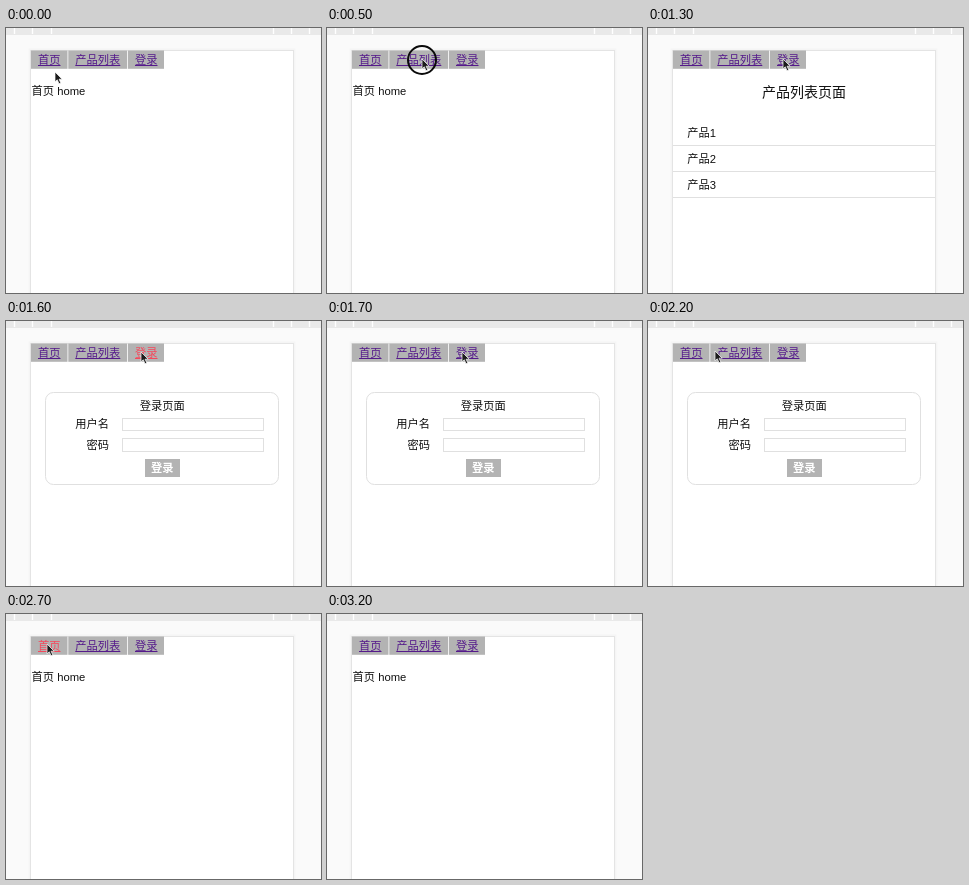
An HTML page that plays this animation: 315x265 px, repeating every 3300 ms.

```html
<!DOCTYPE html>
<html lang="zh-CN">
<head>
<meta charset="utf-8">
<title>Tab routing</title>
<style>
  html, body { margin: 0; width: 100%; height: 100%; overflow: hidden; background: #fafafa; }
  svg { display: block; width: 100%; height: 100%; }
  text { font: 11.25px "Liberation Sans", "Noto Sans CJK SC", "Noto Sans CJK", sans-serif; fill: #111; }
  .title { font-size: 14px; }
  .button { font-weight: bold; fill: #fff; }
  .mid { text-anchor: middle; }
  .end { text-anchor: end; }
  .line { fill: none; stroke: #e0e0e0; }
  .gray { fill: #b3b3b3; }
</style>
</head>
<body>
<svg viewBox="0 0 315 265">
  <rect width="315" height="265" fill="#fafafa"/>
  <rect width="315" height="7" fill="#e9e9e9"/>
  <path d="M8.5 0V6M26.5 0V6M45.5 0V6M267.5 0V6M285.5 0V6M303.5 0V6" stroke="#fff" stroke-width="1.4"/>
  <rect x="23.5" y="21.5" width="265" height="250" fill="none" stroke="#f5f5f5" stroke-width="2"/>
  <rect x="24.5" y="22.5" width="263" height="250" fill="#fff" stroke="#e4e4e4"/>
  <g id="tabs"></g>
  <g id="home"><text x="25.5" y="67">首页 home</text></g>
  <g id="list">
    <text class="title mid" x="156" y="69.3">产品列表页面</text>
    <text x="39.3" y="109">产品1</text>
    <text x="39.3" y="135">产品2</text>
    <text x="39.3" y="161">产品3</text>
    <path class="line" d="M25 117.5H287M25 143.5H287M25 169.5H287"/>
  </g>
  <g id="login">
    <rect class="line" x="39.5" y="71.5" width="233" height="92" rx="8"/>
    <text class="mid" x="156.3" y="89">登录页面</text>
    <text class="end" x="103" y="107.2">用户名</text>
    <text class="end" x="103" y="127.7">密码</text>
    <rect class="line" x="116.5" y="97.5" width="141" height="12"/>
    <rect class="line" x="116.5" y="117.5" width="141" height="13"/>
    <rect class="gray" x="139" y="138" width="35" height="18"/>
    <text class="button mid" x="156.3" y="151.3">登录</text>
  </g>
  <circle id="ring" r="14" fill="none" stroke="#0a0a0a" stroke-width="2"/>
  <path id="cursor" d="M0 0V9.8L2.3 7.8L4 11.7L5.8 10.9L4.1 7.2H7.2Z"
        fill="#1c1c1c" stroke="#fff" stroke-width=".7" stroke-linejoin="round"/>
</svg>
<script>
const LOOP = 3300, STEP = 100;
const $ = id => document.getElementById(id);

const tabs = [
  { page: 'home', label: '首页', x: 25, w: 36.5 },
  { page: 'list', label: '产品列表', x: 62.3, w: 58.9 },
  { page: 'login', label: '登录', x: 122, w: 36 }
];
$('tabs').innerHTML = tabs.map(({ label, x, w }) => `
  <rect class="gray" x="${x}" y="22.5" width="${w}" height="18.3"/>
  <g><text x="${x + 7}" y="35.8" style="fill:inherit">${label}</text>
  <rect x="${x + 7}" y="37" width="${label.length * 11.25}" height="1"/></g>`).join('');
const links = [...$('tabs').querySelectorAll('g')];

const clicks = [
  { at: 500, page: 'list' },
  { at: 1500, page: 'login' },
  { at: 2600, page: 'home' }
];

// Pointer stops: time, x, y
const stops = [
  [200, 49, 44], [300, 95, 31], [1000, 95, 31], [1100, 104, 31],
  [1200, 123, 31], [1300, 135, 31], [2000, 135, 31], [2200, 67, 30],
  [2400, 41, 30], [2800, 41, 30], [3100, 199.5, 185.5]
];

function pointer(t) {
  if (t <= stops[0][0]) return stops[0].slice(1);
  const i = stops.findIndex(s => t <= s[0]);
  if (i < 0) return stops[stops.length - 1].slice(1);
  const [t0, x0, y0] = stops[i - 1], [t1, x1, y1] = stops[i];
  const k = (t - t0) / (t1 - t0);
  return [x0 + (x1 - x0) * k, y0 + (y1 - y0) * k];
}

function show(id, on) {
  $(id).style.display = on ? '' : 'none';
}

function render(time) {
  const t = Math.floor(time % LOOP / STEP) * STEP;
  const [x, y] = pointer(t);
  const last = clicks.filter(c => t > c.at).pop();
  const page = last ? last.page : 'home';
  const active = last && t - last.at <= STEP;

  tabs.forEach((tab, i) => {
    show(tab.page, tab.page === page);
    links[i].setAttribute('fill', active && tab.page === page ? '#f5485c' : '#551a8b');
  });
  show('ring', clicks.some(c => c.at === t));
  show('cursor', t < 3200);
  $('ring').setAttribute('transform', `translate(${x} ${y + 1})`);
  $('cursor').setAttribute('transform', `translate(${x} ${y})`);
}

const start = performance.now();
function tick() {
  render(performance.now() - start);
  requestAnimationFrame(tick);
}
tick();
</script>
</body>
</html>
```
